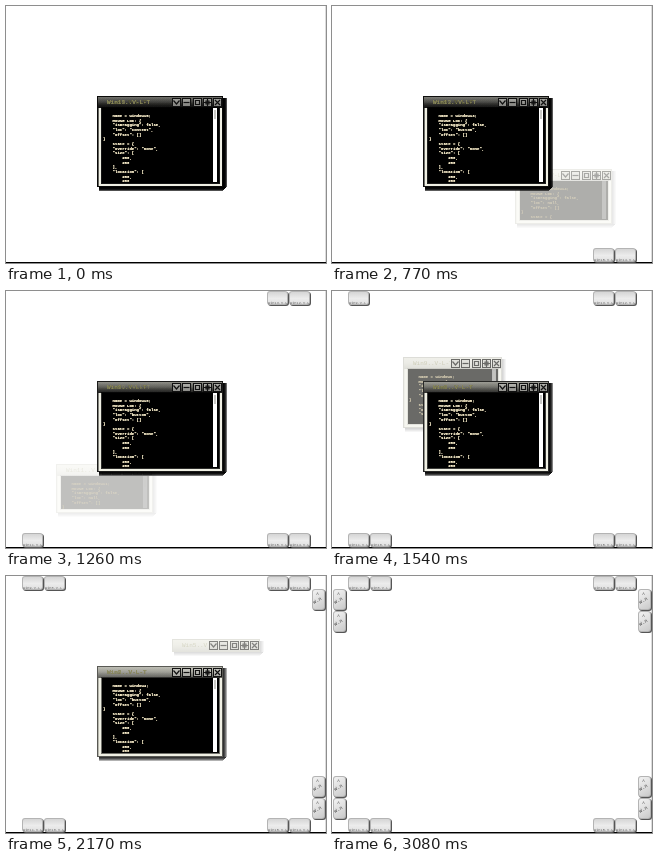
Write an HTML page with a canvas that moves like this. It is 320x257 px and loops after 3430 ms.

```html
<!DOCTYPE html>
<html lang="en">
<head>
<meta charset="utf-8">
<title>Minimising windows</title>
<style>
html, body { margin: 0; width: 100%; height: 100%; overflow: hidden; background: #fff; }
canvas { display: block; width: 320px; height: 257px; }
</style>
</head>
<body>
<canvas id="stage" width="320" height="257"></canvas>
<script>
const g = document.getElementById('stage').getContext('2d');
const LOOP = 3430, STEP = 70, FLIGHT = 115, COUNT = 16;
const HOME = { x: 91, y: 90, w: 126, h: 91 };
const MONO = '"Liberation Mono", monospace';

// Moment at which each window, topmost first, is minimised.
const starts = [560, 715, 872, 1032, 1197, 1353, 1509, 1664,
                1819, 1974, 2130, 2285, 2440, 2595, 2752, 2930];

// Two dock slots per group: four along the edges, then four down the sides.
const groups = [[261, 242], [261, 0], [16, 242], [16, 0],
                [306, 200], [306, 13], [1, 200], [1, 13]];
const slots = starts.map((_, i) => {
  const [x, y] = groups[i >> 1], side = i >= 8, d = (i % 2) * 22;
  return { side, x: x + (side ? 0 : d), y: y + (side ? d : 0) };
});

function gradient(x0, y0, x1, y1, ...stops) {
  const f = g.createLinearGradient(x0, y0, x1, y1);
  stops.forEach((c, i) => f.addColorStop(i / (stops.length - 1), c));
  return f;
}

function box(x, y, w, h, fill) {
  g.fillStyle = fill;
  g.fillRect(x, y, w, h);
}

function clipped(x, y, w, h, draw) {
  g.save();
  g.beginPath();
  g.rect(x, y, w, h);
  g.clip();
  draw();
  g.restore();
}

function label(text, x, y, size, color, weight = 'normal') {
  g.font = `${weight} ${size}px ${MONO}`;
  g.fillStyle = color;
  g.fillText(text, x, y);
}

const glyphs = [
  'M1.5 2.5L4.5 6L7.5 2.5',
  'M1.5 4.5H7.5',
  'M2.5 2.5H6.5V6.5H2.5Z',
  'M4.5 1V8M1 4.5H8M3 3H6V6H3Z',
  'M2 2L7 7M7 2L2 7'
].map(d => new Path2D(d));

function buttons(right, y) {
  glyphs.forEach((glyph, i) => {
    g.save();
    g.translate(Math.round(right - 51 + i * 10.3), y + 2);
    box(0, 0, 9, 9, 'rgba(205,205,200,.6)');
    g.strokeStyle = '#111';
    g.lineWidth = 1;
    g.strokeRect(0.5, 0.5, 8, 8);
    g.lineWidth = 1.2;
    g.stroke(glyph);
    g.restore();
  });
}

// One translucent sheet of window frame; a pile of them grows darker.
function chrome(x, y, w, h, id) {
  for (let i = 0; i < 4; i++) {
    const shade = `rgba(0,0,0,${0.28 * (1 - i / 4)})`;
    box(x + w + i, y + 2, 1, h - 2, shade);
    box(x + 2, y + h + i, w + 1 - i, 1, shade);
  }
  box(x + 1, y + 1, w - 2, Math.min(h, 12) - 1,
    gradient(0, y, 0, y + 12, 'rgba(0,0,0,.04)', 'rgba(0,0,0,.08)', 'rgba(0,0,0,.17)'));
  g.lineWidth = 1;
  g.strokeStyle = 'rgba(0,0,0,.18)';
  g.strokeRect(x + 0.5, y + 0.5, w - 1, h - 1);
  if (h > 17) {
    // Bevel: dark outer edge, pale band, dark inner edge.
    box(x + 1, y + 12, 1, h - 13, 'rgba(0,0,0,.05)');
    g.strokeStyle = 'rgba(0,0,0,.14)';
    g.strokeRect(x + 4.5, y + 11.5, w - 8, h - 15);
  }
  clipped(x, y, w - 52, h, () =>
    label(`Win${id}..V-L-T`, x + 10, y + 8, 6, 'rgba(152,150,100,.6)'));
}

function code(id, loc) {
  return [
    [4, `name = window${id};`], [4, 'MOUSE LOC: {'], [4, '"isDragging": false,'],
    [4, `"loc": ${loc},`], [4, '"offset": []'], [0, '}'],
    [4, 'state = {'], [4, '"override": "none",'], [4, '"size": ['],
    [8, '250,'], [8, '250'], [4, '],'], [4, '"location": ['], [8, '250,'], [8, '250']
  ];
}

function content(x, y, w, h, id, loc) {
  const cx = x + 5, cy = y + 12, cw = w - 9, ch = h - 16;
  if (ch <= 0) return;
  box(cx, cy, cw, ch, '#000');
  clipped(cx, cy, cw - 7, ch, () => code(id, loc).forEach(([indent, text], i) => {
    // Two passes give the tiny type its full weight.
    for (let pass = 0; pass < 2; pass++)
      label(text, x + 6 + indent * 2.4, Math.round(y + 21 + i * 4.67), 4, '#fff3cf', 'bold');
  }));
  box(x + w - 10, cy, 4, ch - 1, '#fff');
  box(x + w - 9, cy + 2, 2, Math.min(9, ch - 3), '#c8c8c4');
}

function win(x, y, w, h, id, loc, pile) {
  box(x, y, w, h, '#f0f0e4');
  for (let i = 0; i < pile; i++) chrome(x, y, w, h, id - pile + 1 + i);
  content(x, y, w, h, id, loc);
  buttons(w + x, y);
}

function ghost(i, p) {
  const s = slots[i];
  const x = HOME.x + (s.x - HOME.x) * p, y = HOME.y + (s.y - HOME.y) * p;
  const w = s.side ? Math.max(88, HOME.w - 112 * p) : Math.max(97, HOME.w - 100 * p);
  const h = s.side ? 13 : HOME.h - 76 * p;
  g.save();
  g.globalAlpha = (1 - p) ** 1.8;
  win(Math.round(x), Math.round(y), Math.round(w), Math.round(h), COUNT - 1 - i, 'null', 1);
  g.restore();
}

function icon(i) {
  const { x, y, side } = slots[i], id = COUNT - 1 - i;
  const w = side ? 14 : 22, h = side ? 22 : 15;
  const tile = (dx, dy, fill) => {
    g.beginPath();
    g.roundRect(x + dx, y + dy, w - 1, h - 1, 3);
    g.fillStyle = fill;
    g.fill();
  };
  tile(1, 1, '#555');
  tile(0, 0, '#b4b4b4');
  g.beginPath();
  g.roundRect(x + 1, y + 1, w - 3, h - 3, 2);
  g.fillStyle = side
    ? gradient(x, y, x + w, y + h, '#f4f4f4', '#dedede', '#c4c4c4')
    : gradient(x, y, x, y + h, '#d2d2d2', '#ececec', '#dcdcdc');
  g.fill();
  clipped(x + 1, y + 1, w - 2, h - 2, () => {
    if (!side) return label(`Win${id}.V-L`, x + 1, y + 13, 3.6, '#666');
    label('^', x + 4, y + 7, 5, '#555');
    g.translate(x + 2, y + 15);
    g.rotate(-0.5);
    label('W.n', 0, 0, 5, '#444');
  });
}

function draw(t) {
  box(0, 0, 320, 257, '#fff');
  box(319, 0, 1, 257, '#dcdcdc');
  box(0, 256, 320, 1, '#000');
  const gone = starts.filter(s => s <= t).length;
  for (let i = 0; i < gone; i++) icon(i);
  for (let i = 0; i < gone; i++) {
    const p = (t - starts[i]) / FLIGHT;
    if (p < 1) ghost(i, p);
  }
  const left = COUNT - gone;
  const loc = t < 70 ? '"content"' : t < 140 ? 'null' : '"button"';
  if (left) win(HOME.x, HOME.y, HOME.w, HOME.h, left - 1, loc, left);
}

const t0 = performance.now();
function tick() {
  const t = (performance.now() - t0) % LOOP;
  draw(Math.floor(t / STEP) * STEP);
  requestAnimationFrame(tick);
}
tick();
</script>
</body>
</html>
```
